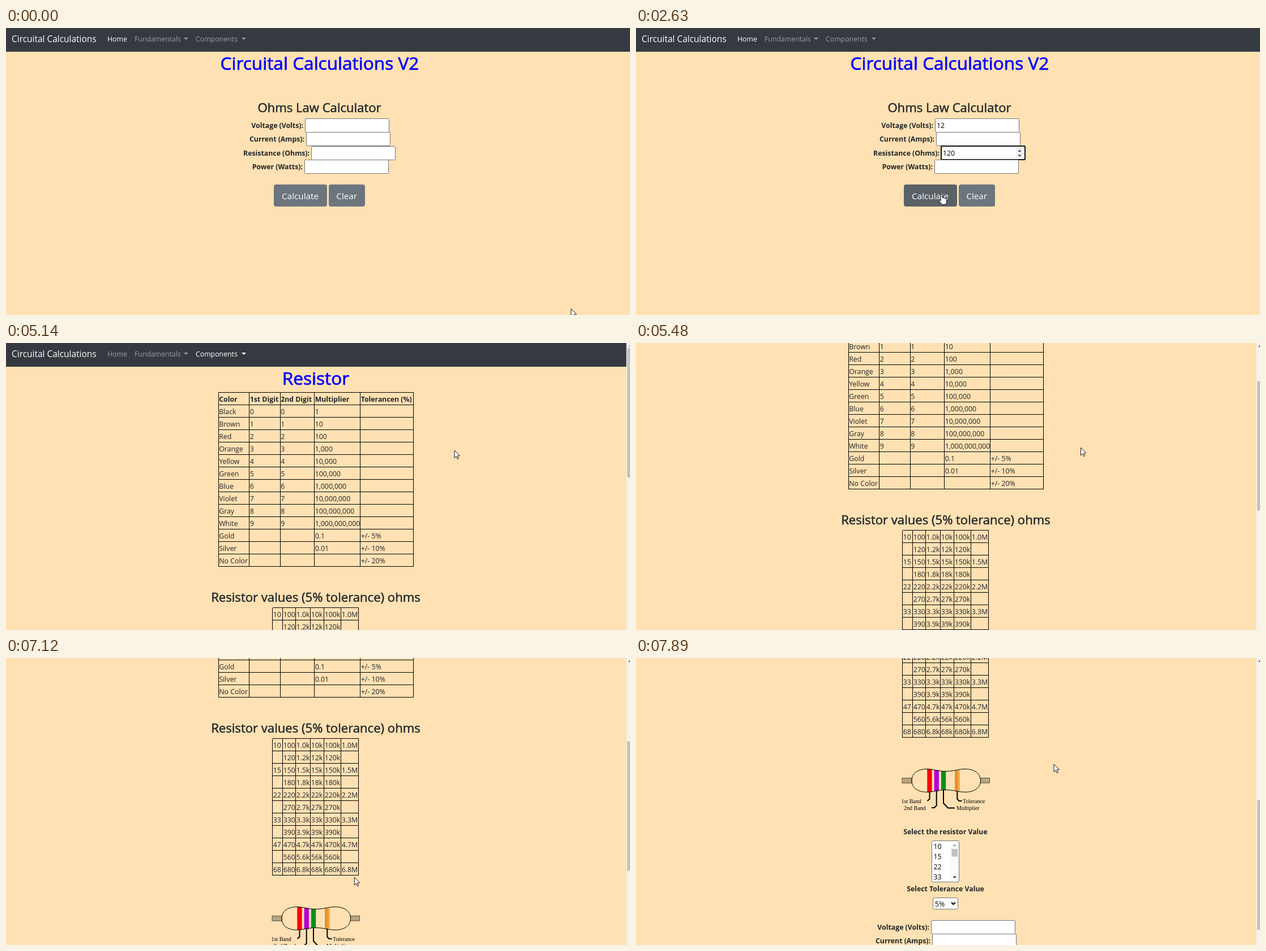
Write an HTML page that moves like this. It is 1102 by 508 pixels and loops after 7990 ms.

```html
<!DOCTYPE html>
<html lang="en">
<head>
<meta charset="utf-8">
<title>Resistor calculator demo</title>
<style>
  html, body { margin: 0; width: 100%; height: 100%; overflow: hidden; background: #ffe1b3; }
  svg { display: block; width: 1102px; height: 508px; }
  text { font: 12.35px "Open Sans", "Noto Sans", sans-serif; fill: #212529; white-space: pre; }
  .brand { font-size: 15.48px; fill: #fff; }
  .nav { font-size: 12.3px; fill: #999da0; }
  .on { fill: #fff; }
  .title { font-size: 31.6px; fill: #00f; stroke: #00f; stroke-width: .7; }
  .sub { font-size: 22.1px; stroke: #212529; stroke-width: .5; }
  .bold { font-size: 12.3px; font-weight: 700; }
  .btn { font-size: 15.3px; fill: #fff; }
  .field { fill: #000; }
  .serif { font: 10px "Liberation Serif", "Noto Serif", serif; fill: #000; }
  .mid { text-anchor: middle; }
  .end { text-anchor: end; }
  .box { fill: #fff; stroke: #767676; }
  .focus { stroke: #101010; stroke-width: 2; transform: translate(-.5px, -.5px); }
  .grid { fill: none; stroke: #000; shape-rendering: crispEdges; }
  .wire { fill: none; stroke: #000; stroke-width: 2; }
  .pointer { fill: #fff; stroke: #000; stroke-width: .9; stroke-linejoin: round; }
</style>
</head>
<body>
<svg id="stage" viewBox="0 0 1102 508" xmlns="http://www.w3.org/2000/svg"></svg>
<script>
const LOOP = 7990;
const BRAND = 'Circuital Calculations';

// ---- markup helpers ----
const text = (x, y, s, cls = '', id = '') => `<text x="${x}" y="${y}" class="${cls}" id="${id}">${s}</text>`;
const rect = (x, y, w, h, attrs = '') => `<rect x="${x}" y="${y}" width="${w}" height="${h}" ${attrs}/>`;
const path = (d, attrs = '') => `<path d="${d}" ${attrs}/>`;
const group = (id, body) => `<g id="${id}">${body}</g>`;
const tri = (x, y, w, h, fill) => path(`M${x - w} ${y}h${2 * w}l${-w} ${h}z`, `fill="${fill}"`);

function grid(xs, top, rowH, rows) {
  const bottom = top + rows * rowH, last = xs[xs.length - 1];
  let d = xs.map(x => `M${x} ${top}V${bottom}`).join('');
  for (let i = 0; i <= rows; i++) d += `M${xs[0]} ${top + i * rowH}H${last + .5}`;
  return path(d, 'class="grid"');
}

const cells = (xs, y, row, cls) => row.map((s, i) => text(xs[i] + 1.2, y, s, cls)).join('');

function navbar(id, width, homeOn, partsOn) {
  const tone = on => on ? 'nav on' : 'nav';
  const caret = (x, on) => tri(x, 17, 4, 4, on ? '#fff' : '#999da0');
  return rect(0, 0, width, 42, 'fill="#343a40"') +
    text(10, 25, BRAND, 'brand') +
    text(179, 24, 'Home', tone(homeOn)) +
    text(227, 24, 'Fundamentals', tone(false)) + caret(318, false) +
    group(id, text(335, 24, 'Components', tone(partsOn)) + caret(420, partsOn));
}

// ---- home page ----
const FIELDS = [
  { id: 'volt', label: 'Voltage (Volts):', x: 528, y: 160 },
  { id: 'amp', label: 'Current (Amps):', x: 530, y: 184 },
  { id: 'ohm', label: 'Resistance (Ohms):', x: 539, y: 209 },
  { id: 'watt', label: 'Power (Watts):', x: 527, y: 233 }
];

const labelledBox = (label, x, y, id = '') => text(x - 3, y + 16.6, label, 'bold end') +
  rect(x + .5, y + .5, 148, 24, `class="box" rx="1" id="${id}"`);

function field({ id, label, x, y }) {
  const up = x + 138.5;
  return labelledBox(label, x, y, id + 'Box') +
    group(id + 'Spin', rect(up - 6, y + 3, 13, 18.5, 'fill="#f0f0f0"') +
      tri(up, y + 10, 3.2, -3.6, '#505050') + tri(up, y + 15.5, 3.2, 3.6, '#505050')) +
    text(x + 3, y + 16.7, '', 'field', id + 'Text') +
    rect(x, y + 3.5, 1, 17, `fill="#000" id="${id}Caret"`);
}

const ITEMS = ['Resistors', 'Capacitors', 'Inductors', 'Cables And Wires'];
const menu = rect(329.5, 38, 140, 117, 'rx="3.5" fill="#fff" stroke="#000" stroke-opacity=".17"') +
  rect(330, 44.5, 139.5, 26, 'fill="#f8f9fa" id="hoverItem"') +
  rect(329.5, 96, 140, 26, 'fill="#007bff"') +
  ITEMS.map((s, i) => text(349, 62 + 26 * i, s, i === 2 ? 'on' : '')).join('');

const home = navbar('homeParts', 1102, true, false) +
  text(554, 74, BRAND + ' V2', 'title mid') +
  text(553.5, 149, 'Ohms Law Calculator', 'sub mid') +
  FIELDS.map(field).join('') +
  rect(471, 275, 98, 43, 'rx="5" fill="#6c757d" fill-opacity=".5" id="ring"') +
  rect(473, 277, 94, 39, 'rx="4" id="calc"') + text(519.5, 302.5, 'Calculate', 'btn mid') +
  rect(570, 277, 64, 39, 'rx="4" fill="#6c757d"') + text(601.7, 302.5, 'Clear', 'btn mid') +
  group('menu', menu);

// ---- resistor page ----
function colourTable() {
  const xs = [375, 429.5, 484, 544.5, 625.5, 719];
  const names = ['Black', 'Brown', 'Red', 'Orange', 'Yellow', 'Green', 'Blue', 'Violet', 'Gray', 'White'];
  const rows = names.map((n, i) => [n, i, i, (10 ** i).toLocaleString('en-US'), '']);
  rows.push(['Gold', '', '', '0.1', '+/- 5%'], ['Silver', '', '', '0.01', '+/- 10%'], ['No Color', '', '', '', '+/- 20%']);
  return grid(xs, 87.5, 22, 14) +
    cells(xs, 103.5, ['Color', '1st Digit', '2nd Digit', 'Multiplier', 'Tolerancen (%)'], 'bold') +
    rows.map((r, i) => cells(xs, 125.5 + 22 * i, r)).join('');
}

function valueTable() {
  const xs = [470.5, 488.5, 511.5, 537.5, 561.5, 591.5, 622.5];
  const bases = [10, 12, 15, 18, 22, 27, 33, 39, 47, 56, 68];
  return grid(xs, 468.5, 22, 11) + bases.map((b, i) => {
    const small = (b / 10).toFixed(1), even = i % 2 === 0;
    return cells(xs, 484.7 + 22 * i, [even ? b : '', b * 10, small + 'k', b + 'k', b * 10 + 'k', even ? small + 'M' : '']);
  }).join('');
}

function resistor() {
  const lead = 'fill="#b8a582" stroke="#4a4132" stroke-width=".9"';
  return `<g transform="translate(0 416)">` +
    rect(470, 366.7, 17, 8.6, lead) + rect(608.5, 366.5, 16, 8.6, lead) +
    rect(514.3, 351, 8.3, 40, 'fill="#f00"') +
    rect(526.6, 352.5, 8.3, 37, 'fill="#b400d2"') +
    rect(538.9, 354, 8.3, 34, 'fill="#009020"') +
    rect(563.2, 352.5, 8.5, 37, 'fill="#f0a545"') + rect(563.2, 352.5, 4.5, 37, 'fill="#e78f2c"') +
    path('M487 371C487 357 499 350.5 514 350.5C527 350.5 531 354.5 547 354.5S567 350.5 582 350.5C597 350.5 608.5 358 608.5 371S597 391.3 582 391.3C567 391.3 563 387.5 547 387.5S527 391.3 514 391.3C499 391.3 487 385 487 371Z',
      'fill="none" stroke="#000" stroke-width="1"') +
    path('M518.5 391V403.5L514.5 407M530.7 389V415L527 419H522M543 388V411L551 419.5H563M567.3 389V403.5L570.5 407H575.5', 'class="wire"') +
    text(468.5, 411, '1st Band', 'serif') + text(473, 422.7, '2nd Band', 'serif') +
    text(577, 410.5, 'Tolerance', 'serif') + text(566, 422.7, 'Multiplier', 'serif') + '</g>';
}

const listBox = rect(522.5, 893.5, 48, 73, 'class="box" rx="2"') +
  [10, 15, 22, 33].map((n, i) => text(525.5, 908 + 18 * i, n, 'field')).join('') +
  rect(556, 895, 13.5, 70, 'fill="#fafafa"') + rect(557.5, 908, 10.5, 13.5, 'fill="#c1c1c1"') +
  tri(562.7, 903, 3.4, -3.6, '#a3a3a3') + tri(562.7, 956.5, 3.4, 3.6, '#404040');

const parts = navbar('partsNav', 1096, false, true) +
  text(547, 74, 'Resistor', 'title mid') + colourTable() +
  text(547, 457.7, 'Resistor values (5% tolerance) ohms', 'sub mid') + valueTable() + resistor() +
  text(546.5, 882, 'Select the resistor Value', 'bold mid') + listBox +
  text(546.5, 983, 'Select Tolerance Value', 'bold mid') +
  rect(524.5, 994.5, 44, 20, 'class="box" rx="2"') + text(528, 1009.5, '5%', 'field') +
  path('M557 1002.5l3.5 3.5 3.5-3.5', 'class="wire"') +
  labelledBox('Voltage (Volts):', 521, 1034) + labelledBox('Current (Amps):', 523, 1058);

const scrollbar = rect(1095.6, 0, 6.4, 508, 'fill="#f1f1f1"') +
  path('M1099 7l3.5-4 3.5 4z', 'id="upArrow"') + rect(1097, 9, 5, 229, 'fill="#c1c1c1" id="thumb"');

const pointers = group('arrow', path('M0 0V13.6L3.1 10.6L5.3 15.4L7.3 14.6L5.2 9.9L9.4 9.6Z', 'class="pointer"')) +
  group('hand', path('M-1.5 9V1a1.5 1.5 0 0 1 3 0V5.5c2-.6 3 0 3 .8 1.5-.3 2.4.2 2.5 1 1.3-.2 2 .4 2 1.6v3c0 2-1 3-1.3 5.6h-7c-.5-2-3.5-4-4.7-6.6 0-1.6 1.5-1.6 3-.2z', 'class="pointer"')) +
  group('beam', path('M-3-7.5h2.5l.5.5.5-.5H3M0-7V7M-3 7.5h2.5l.5-.5.5.5H3', 'fill="none" stroke="#444"'));

document.getElementById('stage').innerHTML = rect(0, 0, 1102, 508, 'fill="#ffe1b3"') +
  group('home', home) + group('parts', parts) + group('bar', scrollbar) + group('cursor', pointers);

// ---- timeline ----
const el = id => document.getElementById(id);
const show = (id, on) => { el(id).style.display = on ? '' : 'none'; };
const within = (t, a, b) => t >= a && t < b;

const BURSTS = [
  [50, 720, 9], [940, 940, 1], [1080, 1810, 10], [1950, 2070, 2], [2260, 2260, 1], [2400, 3140, 11],
  [3220, 3940, 10], [4090, 4160, 2], [4350, 4350, 1], [4500, 5240, 10], [5340, 6110, 10],
  [6200, 6960, 11], [7020, 7810, 11], [7890, 7890, 1]
];

// Cursor hot spot: time, x, y
const PATH = [
  [0, 998, 497], [20, 998, 497], [480, 556, 174], [1060, 556, 174], [1420, 566, 221], [2260, 566, 221],
  [2610, 539.5, 295], [2640, 539.5, 295], [2860, 536, 312], [3140, 412, 240], [3430, 361, 19], [3540, 361, 20],
  [3690, 366, 42], [3770, 366, 42], [3940, 372, 56], [4400, 372, 56], [5070, 792, 190], [5300, 792, 190],
  [6110, 692, 118], [6640, 352, 300], [6960, 560, 412], [7490, 885, 273], [7500, 885, 273],
  [7810, 774, 229], [7890, 738, 188]
];

const SCROLL = [[0, 0], [5160, 0], [5240, 55], [5850, 326], [7420, 326], [7494, 416], [7780, 570]];

function snap(t) {
  let at = 0;
  for (const [a, b, n] of BURSTS) {
    if (t < a) break;
    at = t >= b ? b : a + Math.floor((t - a) / (b - a) * (n - 1) + 1e-6) * (b - a) / (n - 1);
  }
  return at;
}

function sample(keys, t, ease) {
  const i = keys.findIndex(k => k[0] > t);
  if (i < 0) return keys[keys.length - 1].slice(1);
  const a = keys[i - 1], b = keys[i], u = ease((t - a[0]) / (b[0] - a[0]));
  return a.slice(1).map((v, j) => v + (b[j + 1] - v) * u);
}

const linear = u => u;
const smooth = u => u * u * (3 - 2 * u);
const inBox = (x, y, l, top, r, b) => x >= l && x < r && y >= top && y < b;

function values(t) {
  const solved = t >= 2840;
  return {
    volt: '12'.slice(0, t < 700 ? 0 : t < 940 ? 1 : 2),
    ohm: '120'.slice(0, [1640, 1800, 1950].filter(k => t >= k).length),
    amp: solved ? '0.1' : '',
    watt: solved ? '1.2' : ''
  };
}

function drawHome(t, x, y, menuOpen) {
  const vals = values(t);
  const focus = within(t, 540, 1480) ? 'volt' : within(t, 1480, 2760) ? 'ohm' : '';
  let kind = 'arrow';
  for (const f of FIELDS) {
    const over = inBox(x, y, f.x, f.y, f.x + 148, f.y + 24), active = f.id === focus;
    if (over) kind = 'beam';
    el(f.id + 'Box').classList.toggle('focus', active);
    el(f.id + 'Text').textContent = vals[f.id];
    show(f.id + 'Spin', over || active);
    show(f.id + 'Caret', active && t < 2070);
    el(f.id + 'Caret').setAttribute('x', f.x + 3.5 + 7.05 * vals[f.id].length);
  }
  const overCalc = inBox(x, y, 473, 277, 567, 316);
  const overItem = menuOpen && inBox(x, y, 330, 45, 470, 149);
  const overNav = inBox(x, y, 329, 5, 430, 36);
  if (overCalc || overItem || overNav) kind = 'hand';
  el('calc').setAttribute('fill', overCalc ? '#5a6268' : '#6c757d');
  show('ring', within(t, 2760, 3480));
  show('menu', menuOpen);
  show('hoverItem', overItem);
  for (const node of el('homeParts').children) node.style.fill = t >= 3420 ? '#fff' : '';
  return kind;
}

function drawParts(t, x, y) {
  const [top] = sample(SCROLL, t, linear), py = y + top;
  el('parts').setAttribute('transform', `translate(0 ${-Math.round(top)})`);
  el('thumb').setAttribute('y', 9 + .426 * top);
  el('upArrow').setAttribute('fill', top > 0 ? '#505050' : '#a3a3a3');
  const overText = inBox(x, py, 362, 434, 732, 464) || inBox(x, py, 471, 469, 623, 710) || inBox(x, py, 375, 87, 719, 395);
  return overText ? 'beam' : 'arrow';
}

function draw(now) {
  const t = snap(now);
  const [x, y] = sample(PATH, t, smooth);
  const onHome = t < 4350;
  show('home', onHome);
  show('parts', !onHome);
  show('bar', !onHome);
  const kind = onHome ? drawHome(t, x, y, within(t, 3500, 4160)) : drawParts(t, x, y);
  for (const k of ['arrow', 'hand', 'beam']) show(k, k === kind);
  // Typing hides the pointer
  show('cursor', !within(t, 700, 1080) && !within(t, 1640, 2260));
  el('cursor').setAttribute('transform', `translate(${x.toFixed(1)} ${y.toFixed(1)})`);
}

const start = performance.now();
function tick() {
  draw((performance.now() - start) % LOOP);
  requestAnimationFrame(tick);
}
draw(0);
requestAnimationFrame(tick);
</script>
</body>
</html>
```
